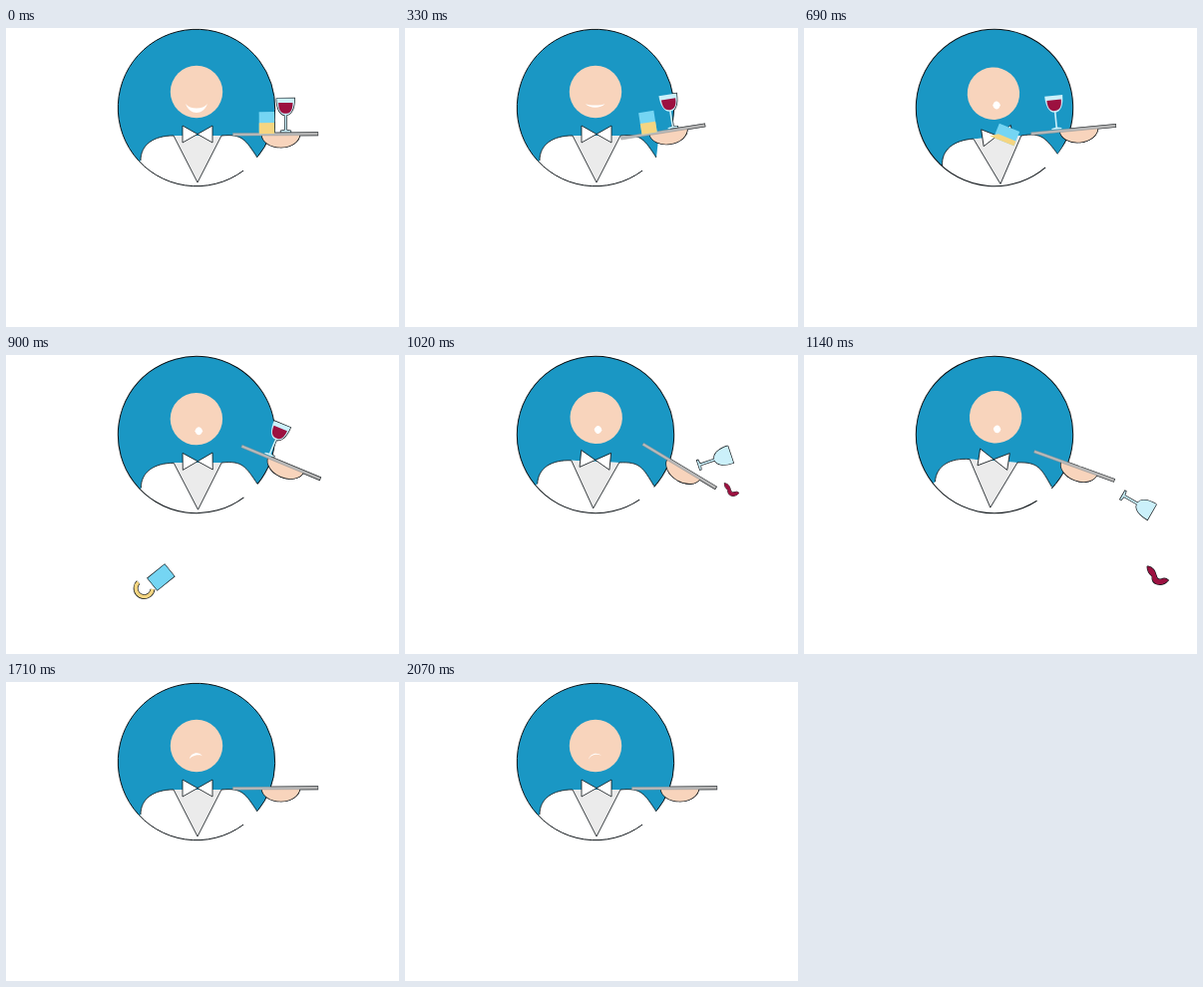
These frames come from a looping animation (394x300 px, 2.73 s). An HTML page with a canvas:

```html
<!DOCTYPE html>
<html lang="en">
<head>
<meta charset="utf-8">
<title>Waiter</title>
<style>
html, body { margin: 0; width: 100%; height: 100%; overflow: hidden; background: #fff; }
canvas { display: block; width: 394px; height: 300px; }
</style>
</head>
<body>
<canvas id="stage" width="394" height="300"></canvas>
<script>
const ctx = document.getElementById('stage').getContext('2d');
const LOOP = 2730, STEP = 30, LAST = 2070;
const INK = '#0c1216', BLUE = '#1a97c4', SKIN = '#f8d4bc', GRAY = '#bababa';
const CYAN = '#75d5f3', JUICE = '#f5d581', PALE = '#cbf0fa', WINE = '#9c1140';
const CX = 191, CY = 80, R = 78.7, DEG = Math.PI / 180;

// Moments of the act, in ms
const LEAN = 330, SLIP = 690, DROP = 900, TIP = 1010, SAG = 1140, BACK = 1410;

const lerp = (a, b, u) => a + (b - a) * u;
const smooth = u => u * u * (3 - 2 * u);
const ramp = (t, from, to) => Math.max(0, Math.min(1, (t - from) / (to - from)));
const quad = (d, from, speed, pull) => from + d * (speed + pull * d);
const drift = (d, from, reach) => from + reach * (1 - Math.exp(-d / 200));

// Rounded pulse around a moment
function pulse(t, mid, width) {
  const u = Math.abs(t - mid) / width;
  return u < 1 ? Math.cos(u * Math.PI / 2) ** 2 : 0;
}

const tiltAt = t => 4 * pulse(t, SAG, 290) - 3.8 * pulse(t, SLIP, 290);

function trayAt(t) {
  const lean = pulse(t, LEAN, 300), slip = pulse(t, SLIP, 240);
  const back = pulse(t, BACK, 250);
  return {
    x: 275.5 - 11.5 * lean + 5.5 * pulse(t, 940, 250),
    y: 106.5 - 3.2 * lean - 5 * slip + 8 * pulse(t, 1060, 300) + 2 * back,
    angle: -0.4 - 8.6 * lean - 5.1 * slip + 31.5 * pulse(t, TIP, 320) - 6.3 * back
  };
}

function onTray(tray, along, up) {
  const c = Math.cos(tray.angle * DEG), s = Math.sin(tray.angle * DEG);
  return [tray.x + along * c + up * s, tray.y + along * s - up * c];
}

// Mouths: half width, inner bend, thickness, middle x, slant
const SMILE = [11, 6, 6, 191, 0], GRIN = [9.7, 2, 3, 190.7, 0], GASP = [3.8, -5.3, 10.6, 193.3, 0];
const FROWN = [7, -6.6, 4.2, 190.5, -12], POUT = [6.7, -5.4, 1.4, 190.5, -15];
const MOODS = [[30, SMILE], [LEAN, GRIN], [540, GASP], [SAG, GASP], [BACK, FROWN], [LAST, POUT]];

function mouthAt(t) {
  let mouth = SMILE;
  for (let i = 1; i < MOODS.length; i++) {
    const u = smooth(ramp(t, MOODS[i - 1][0], MOODS[i][0]));
    mouth = mouth.map((v, k) => lerp(v, MOODS[i][1][k], u));
  }
  return mouth;
}

function at(x, y, angle, draw) {
  ctx.save();
  ctx.translate(x, y);
  ctx.rotate(angle * DEG);
  draw();
  ctx.restore();
}

function poly(...p) {
  ctx.beginPath();
  for (let i = 0; i < p.length; i += 2) ctx.lineTo(p[i], p[i + 1]);
  ctx.closePath();
}

function outline(width = 0.8, color = INK) {
  ctx.strokeStyle = color;
  ctx.lineWidth = width;
  ctx.stroke();
}

// Under the disc each shape leaves only a dark rim
function paint(color, rim) {
  if (rim) return outline(1.3);
  ctx.fillStyle = color;
  ctx.fill();
}

function tumbler(t, tray, rim) {
  const d = t - LEAN;
  let [x, y] = onTray(tray, -14 - 5 * ramp(t, 30, LEAN), 11.5);
  let angle = tray.angle;
  if (d > 0) {
    x = quad(d, 244, -0.0415, -0.0002);
    y = quad(d, 95, -0.2947, 0.000911);
    angle = quad(d, -9, -0.084, -0.000222);
  }
  if (y > 340) return;
  at(x, y, angle, () => {
    poly(-7.7, -11, 7.7, -11, 7.7, 11, -7.7, 11);
    paint(CYAN, rim);
    if (t < 795) {
      const u = ramp(t, LEAN, SLIP), side = lerp(7.7, -2.5, u);
      poly(-7.7, 11, side, 11, side, -8 * u, -7.7, -15 * u);
      paint(JUICE, rim);
    } else {
      ctx.beginPath();
      ctx.arc(2, -20, 8.5, 135 * DEG, 355 * DEG);
      outline(rim ? 4.8 : 3.5, rim ? INK : JUICE);
    }
  });
}

function cup(w, top, bottom) {
  ctx.beginPath();
  ctx.moveTo(-w, top);
  ctx.lineTo(w, top);
  ctx.bezierCurveTo(w, top * 0.4, w * 0.65, bottom, 0, bottom);
  ctx.bezierCurveTo(-w * 0.65, bottom, -w, top * 0.4, -w, top);
}

function goblet(t, tray, rim) {
  const hop = ramp(t, LEAN, 660), d = t - DROP;
  const along = 5 - 27 * smooth(hop) + 3 * ramp(t, SLIP, DROP);
  let [x, y] = onTray(tray, along, 19);
  let angle = tray.angle;
  y -= 240 * hop * (1 - hop);
  if (d > 0) {
    x = drift(d, 267, 96);
    y = quad(d, 90, 0.006, 0.001);
    angle = 23 + 0.404 * d;
  }
  if (y > 340) return;
  at(x, y, angle, () => {
    poly(-0.8, -1, 0.8, -1, 0.8, 15, 5, 15.8, 5, 17, -5, 17, -5, 15.8, -0.8, 15);
    paint(PALE, rim);
    cup(9, -17, 0);
    paint(PALE, rim);
    if (d > 30 || rim) return;
    cup(7.2, -12.5, -1.6);
    paint(WINE);
  });
}

function spill(t, rim) {
  const d = t - DROP;
  if (d <= 30 || d > 420) return;
  at(drift(d, 278, 109), quad(d, 78, 0.36, 0.001), 0, () => {
    const s = lerp(0.4, 1, ramp(d, 0, 240));
    ctx.scale(s, s);
    ctx.beginPath();
    ctx.moveTo(-10, -10);
    ctx.bezierCurveTo(2, -8, -4, 5, 4, 3);
    ctx.quadraticCurveTo(8, 1, 11, 4);
    ctx.bezierCurveTo(4, 12, -6, 8, -5, 0);
    ctx.quadraticCurveTo(-10, -4, -10, -10);
    paint(WINE, rim);
  });
}

function hand(tray, rim) {
  at(tray.x, tray.y, tray.angle, () => {
    ctx.beginPath();
    ctx.ellipse(0, 0, 19, 13.2, 0, 0, Math.PI);
    ctx.closePath();
    paint(SKIN, rim);
  });
}

function plate(tray, rim) {
  at(tray.x, tray.y, tray.angle, () => {
    poly(-48, -1.3, 37, -1.3, 37, 1.3, -48, 1.3);
    paint(GRAY, rim);
    if (!rim) outline(0.4, '#888');
  });
}

function props(t, tray, rim) {
  goblet(t, tray, rim);
  hand(tray, rim);
  plate(tray, rim);
  tumbler(t, tray, rim);
  spill(t, rim);
}

function shoulders() {
  const left = () => ctx.bezierCurveTo(135, 117, 148, 108, 168, 108);
  const right = () => ctx.bezierCurveTo(237, 106, 240, 112, 252, 130);
  ctx.beginPath();
  ctx.moveTo(135, 133);
  left();
  ctx.lineTo(216, 108);
  right();
  ctx.arc(CX, CY, R + 2.5, 39.3 * DEG, 136.6 * DEG);
  paint('#fff');
  ctx.beginPath();
  ctx.moveTo(135, 133);
  left();
  ctx.moveTo(216, 108);
  right();
  outline();
  poly(168, 108, 216, 108, 192, 155);
  paint('#ebebeb');
  ctx.beginPath();
  ctx.moveTo(168, 108);
  ctx.lineTo(192, 155);
  ctx.lineTo(216, 108);
  outline();
}

function bowTie() {
  for (const side of [-15, 15]) {
    poly(0, 0, side, -8.5, side, 8.5);
    paint('#fff');
    outline();
  }
}

function face(t) {
  ctx.beginPath();
  ctx.arc(191, 64, 26.2, 0, 7);
  paint(SKIN);
  const [half, bend, thick, x, slant] = mouthAt(t);
  at(x, 76, slant, () => {
    const p = half * 0.6;
    ctx.beginPath();
    ctx.moveTo(-half, 0);
    ctx.bezierCurveTo(-p, bend + thick, p, bend + thick, half, 0);
    ctx.bezierCurveTo(p, bend, -p, bend, -half, 0);
    paint('#fff');
  });
}

function draw(t) {
  const tray = trayAt(t), tilt = tiltAt(t), bob = -0.45 * tilt;
  const inDisc = (dy, part) => at(CX, CY + dy, tilt, () => {
    ctx.translate(-CX, -CY);
    part();
  });
  ctx.fillStyle = '#fff';
  ctx.fillRect(0, 0, 394, 300);
  props(t, tray, true);

  ctx.beginPath();
  ctx.arc(CX, CY, R, 0, 7);
  paint(BLUE);
  inDisc(bob, shoulders);
  inDisc(0, () => {
    ctx.beginPath();
    ctx.arc(CX, CY, R, 53.3 * DEG, 399.3 * DEG);
    outline(1);
  });

  // Cuff joining the hand to the elbow
  poly(tray.x - 10, tray.y + 9, 252, 130, 272, 130, 278, 110);
  paint('#fff');
  hand(tray, true);

  inDisc(bob, () => {
    face(t);
    at(192, 106.5, tilt * 1.2, bowTie);
  });
  props(t, tray, false);
}

const start = performance.now();
function tick() {
  const t = (performance.now() - start) % LOOP;
  draw(t < 60 ? 0 : Math.min(LAST, Math.floor(t / STEP) * STEP));
  requestAnimationFrame(tick);
}
tick();
</script>
</body>
</html>
```
